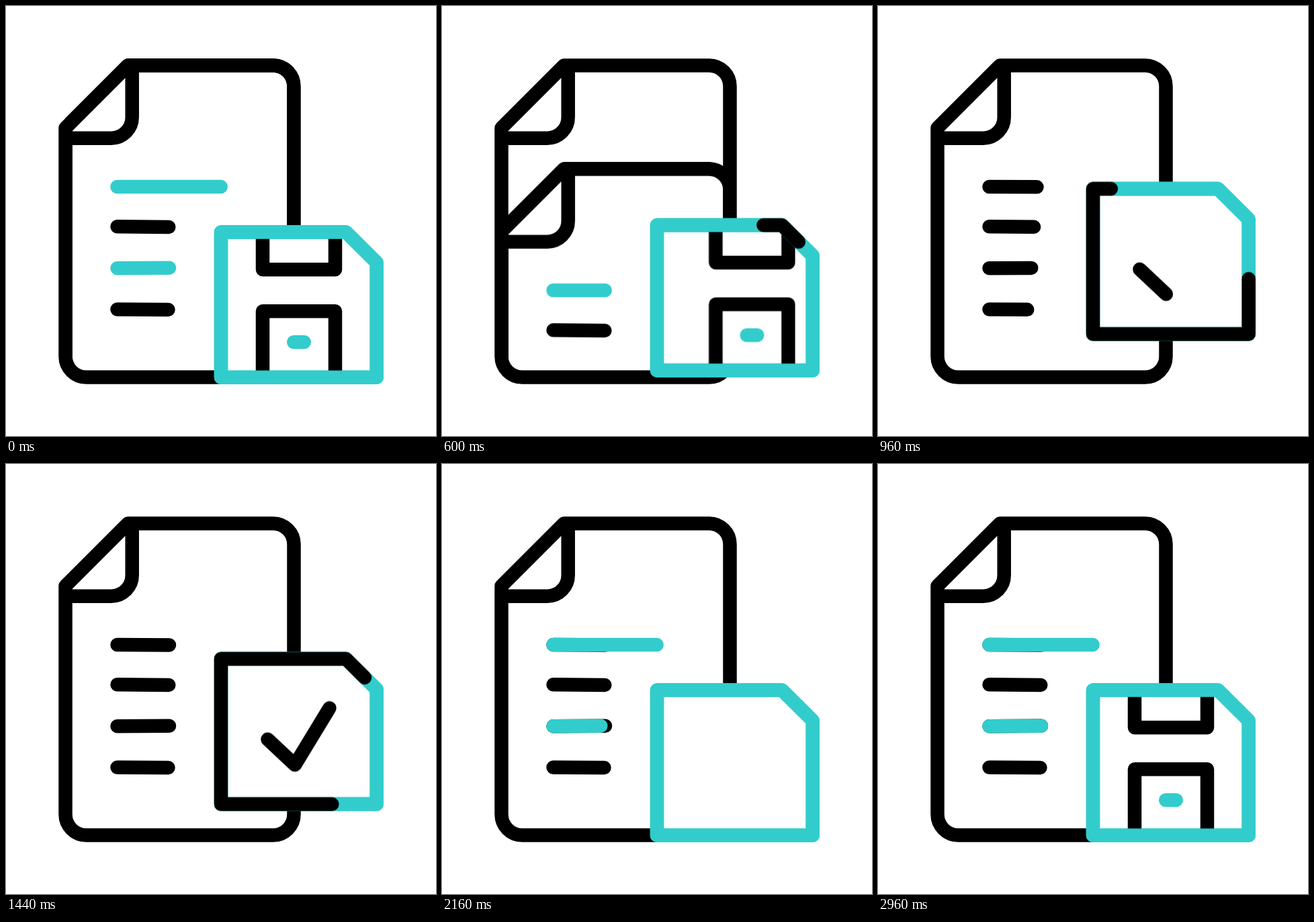
An HTML page that plays this animation: 640x640 px, repeating every 3 s.

```html
<!DOCTYPE html>
<html lang="en">
<head>
<meta charset="utf-8">
<title>Save document</title>
<style>
  html, body { margin: 0; width: 100%; height: 100%; overflow: hidden; background: #fff; }
  svg { display: block; width: 100vw; height: 100vh; }

  :root { --ink: #000; --teal: #33cccc; --ease: cubic-bezier(.333, 0, .667, 1); }
  path { fill: none; stroke: var(--ink); stroke-width: 20.5; stroke-linejoin: round; }
  .round { stroke-linecap: round; }
  .teal { stroke: var(--teal); }
  .paper { fill: #fff; }
  .trim { stroke-dasharray: 100 200; }

  .page, .long, .grow, .tint1, .tint3, .disk, .shutter, .check {
    animation: 3s var(--ease) infinite both;
  }
  .page { animation-name: page; }
  .long { animation-name: long; }
  .grow { animation-name: grow; animation-delay: calc(var(--i) * 24ms); }
  .tint1 { animation-name: tint1; }
  .tint3 { animation-name: tint3; }
  .disk { animation-name: disk; }
  .shutter { animation-name: shutter; }
  .check { animation-name: check; }
  .orbit { animation: lap 3s linear infinite, span 3s linear infinite; }

  /* 1% = 30 ms */
  @keyframes page {
    0%, 11.667% { transform: translateY(0); }
    33.333%, 100% { transform: translateY(464px); }
  }
  @keyframes long {
    0%, 10% { stroke-dashoffset: 0; }
    18.667%, 100% { stroke-dashoffset: 50; }
  }
  /* an offset of 101 also hides the round cap */
  @keyframes grow {
    0%, 18.867% { stroke-dashoffset: 101; }
    34.867%, 100% { stroke-dashoffset: 0; }
  }
  @keyframes tint1 {
    0%, 53.333% { stroke-dashoffset: 101; }
    69.333%, 100% { stroke-dashoffset: 0; }
  }
  @keyframes tint3 {
    0%, 60% { stroke-dashoffset: 101; }
    74.667%, 100% { stroke-dashoffset: 0; }
  }
  @keyframes disk {
    0%, 14.667% { transform: translateY(0); }
    38% { transform: translateY(-77px); }
    61.333%, 100% { transform: translateY(0); }
  }
  @keyframes shutter {
    0%, 16% { transform: translateX(0); }
    33.333% { transform: translateX(185px); }
    33.334%, 71.8% { transform: translateX(-185px); }
    89.2%, 100% { transform: translateX(0); }
  }
  @keyframes check {
    0%, 26.667% { stroke-dashoffset: 101; }
    40%, 61.333% { stroke-dashoffset: 0; }
    72%, 100% { stroke-dashoffset: 101; }
  }
  @keyframes lap {
    0%, 16.667% { stroke-dashoffset: -110; }
    20% { stroke-dashoffset: -158; }
    32% { stroke-dashoffset: -339; }
    40% { stroke-dashoffset: -408; }
    48% { stroke-dashoffset: -487.5; animation-timing-function: cubic-bezier(.4, .1, .7, .75); }
    58.667% { stroke-dashoffset: -1257; }
    61.333%, 100% { stroke-dashoffset: -1440; }
  }
  @keyframes span {
    0%, 16.66% { stroke-dasharray: 0 870; visibility: hidden; }
    16.667% { stroke-dasharray: 0 870; visibility: visible; }
    20% { stroke-dasharray: 62 808; animation-timing-function: cubic-bezier(.35, .2, .6, .9); }
    32% { stroke-dasharray: 557 313; animation-timing-function: ease-out; }
    40% { stroke-dasharray: 640 230; }
    48% { stroke-dasharray: 608 262; animation-timing-function: cubic-bezier(.4, .1, .7, .85); }
    58.667% { stroke-dasharray: 116 754; visibility: visible; }
    61.333% { stroke-dasharray: 0 870; visibility: visible; }
    61.34%, 100% { stroke-dasharray: 0 870; visibility: hidden; }
  }
</style>
</head>
<body>
<svg viewBox="0 0 640 640">
  <defs>
    <path id="sheet" d="M181.5 88.5H397.5a31 31 0 0 1 31 31V521.5a31 31 0 0 1-31 31H119.5a31 31 0 0 1-31-31V181.5Z"/>
    <path id="fold" d="M187.7 89V165.5a31 31 0 0 1-31 31.2H88.5"/>
    <clipPath id="inside"><rect x="88" y="78" width="341" height="455"/></clipPath>
    <clipPath id="case"><path d="M320 336.5H506L551.75 382V552.8H320Z"/></clipPath>
  </defs>

  <!-- fresh page -->
  <use href="#fold"/>
  <g class="round">
    <path class="grow trim" style="--i:0" pathLength="100" d="M165.5 269L243 269.4"/>
    <path class="grow trim" style="--i:1" pathLength="100" d="M165.5 328.3L242.3 328.9"/>
    <path class="grow trim" style="--i:2" pathLength="100" d="M165.5 390.2L243 389.8"/>
    <path class="grow trim" style="--i:3" pathLength="100" d="M165.5 451.5L241.5 452"/>
    <path class="tint1 trim teal" pathLength="100" d="M165.5 269H319.7"/>
    <path class="tint3 trim teal" pathLength="100" d="M165.5 390.2L243 389.8"/>
  </g>

  <!-- page that drops away -->
  <g clip-path="url(#inside)">
    <g class="page">
      <use href="#sheet" fill="#fff"/>
      <path class="paper" d="M181.5 88.5H397.5a31 31 0 0 1 31 31V521.5a31 31 0 0 1-31 31H119.5a31 31 0 0 1-31-31V181.5Z"/>
      <use href="#fold"/>
      <g class="round">
        <path class="long trim teal" pathLength="100" d="M165.5 269H319.7"/>
        <path d="M165.5 328.3L242.3 328.9"/>
        <path class="teal" d="M165.5 390.2L243 389.8"/>
        <path d="M165.5 451.5L241.5 452"/>
      </g>
    </g>
  </g>
  <use href="#sheet"/>

  <g class="disk">
    <path class="paper teal" d="M320 336.5H506L551.75 382V552.8H320Z"/>
    <g clip-path="url(#case)">
      <g class="shutter">
        <path d="M382 336V392.2H490V336M382 553V454.2H490V553"/>
        <path class="round teal" d="M428.2 500.3H443.8"/>
      </g>
    </g>
    <path class="check trim round" pathLength="100" d="M389.5 456.3L430 494.3L481.5 409.7"/>
    <path class="teal" d="M320 336.5H506L551.75 382V552.8H320Z"/>
    <path class="orbit round" pathLength="870" d="M320 336.5H506L551.75 382V552.8H320Z"/>
  </g>
</svg>
</body>
</html>
```
